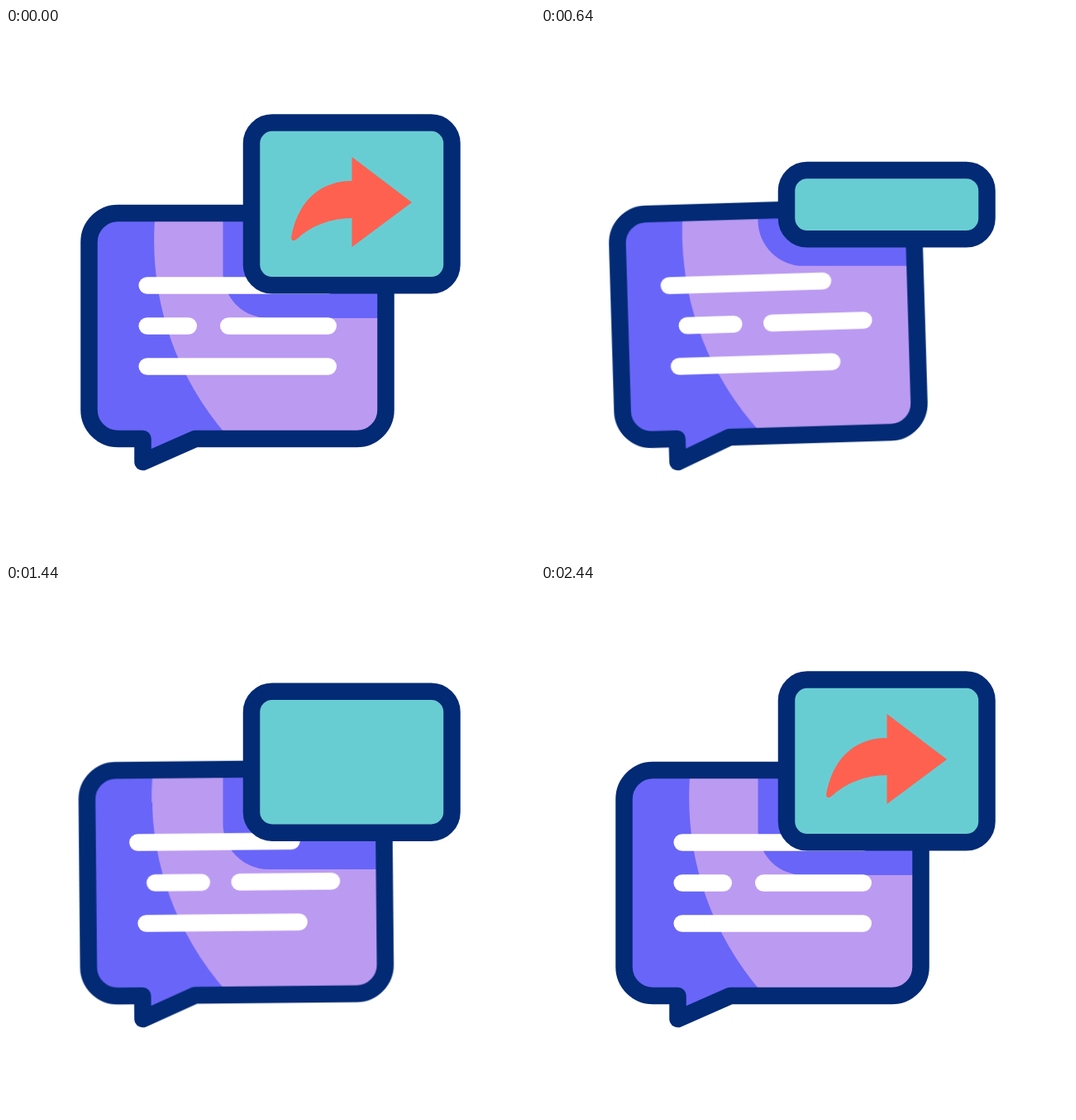
Write an HTML page without scripts that moves like this. It is 640 by 640 pixels and loops after 2640 ms.

```html
<!DOCTYPE html>
<html lang="en">
<head>
<meta charset="utf-8">
<title>Share message</title>
<style>
  @property --slide { syntax: "<number>"; inherits: true; initial-value: 0; }

  html, body { margin: 0; width: 100%; height: 100%; overflow: hidden; background: #fff; }
  svg { display: block; width: 100vw; height: 100vh; }

  .swing, .lines, .card, .shade, .arrow { animation: 2640ms cubic-bezier(.37, 0, .63, 1) infinite; }
  .swing { transform-origin: 165px 525px; animation-name: swing; }
  .lines { animation-name: slide; animation-timing-function: linear; }
  .card { animation-name: card; }
  .shade { animation-name: shade; }
  .arrow { transform-origin: 316px 211px; animation-name: arrow; }

  .outline { fill: none; stroke: #022a75; stroke-width: 20.5; stroke-linejoin: round; }
  .lines rect { height: 20.5px; rx: 10.25px; fill: #fff; }

  /* Every line is driven by the same slide amount. */
  .first { x: calc(160.5px - 26px * var(--slide)); width: calc(239.5px - 92px * var(--slide)); }
  .short { x: calc(160.5px + 31px * var(--slide)); width: calc(70.5px + 18px * var(--slide)); }
  .mid   { x: calc(259px + 42px * var(--slide)); width: calc(141px - 26px * var(--slide)); }
  .last  { x: 160.5px; width: calc(239.5px - 95px * var(--slide)); }

  @keyframes swing {
    0%, 1.515% { transform: rotate(0deg); animation-timing-function: ease-out; }
    5.3% { transform: rotate(3.4deg); }
    12.88% { transform: rotate(-3.1deg); }
    19.7% { transform: rotate(3.4deg); animation-timing-function: ease-in; }
    24.24% { transform: rotate(-1.7deg); animation-timing-function: ease-out; }
    26.89% { transform: rotate(-3.2deg); animation-timing-function: ease-in; }
    34.85% { transform: rotate(1.5deg); animation-timing-function: ease-out; }
    37.12% { transform: rotate(3.4deg); }
    43.18% { transform: rotate(-3.2deg); }
    50.38% { transform: rotate(3.4deg); animation-timing-function: ease-in; }
    54.55% { transform: rotate(-.5deg); animation-timing-function: ease-out; }
    57.95% { transform: rotate(-3.2deg); }
    66.67% { transform: rotate(3.5deg); }
    73.86% { transform: rotate(-3.2deg); }
    78.5%, 100% { transform: rotate(0deg); }
  }
  @keyframes slide {
    0%, 1.515%, 31.82%, 62.12%, 92.42%, 100% { --slide: 0; }
    14.39%, 44.7%, 75% { --slide: 1.03; }
    24.24%, 54.55%, 84.85% { --slide: .36; }
  }
  @keyframes card {
    0%, 1.515%, 80.68%, 100% { y: 114.6px; height: 196.6px; }
    12.88%, 13.64%, 66.29% { y: 108.3px; height: 212.4px; }
    28.79%, 31.82% { y: 188px; height: 50.8px; }
  }
  @keyframes shade {
    0%, 1.515%, 80.68%, 100% { height: 251px; }
    12.88%, 13.64%, 66.29% { height: 270.5px; }
    28.79%, 31.82% { height: 167px; }
  }
  @keyframes arrow {
    0%, 9.09% { transform: scaleX(1); animation-timing-function: ease-in; }
    22.73%, 74.24% { transform: scaleX(0); animation-timing-function: ease-out; }
    92.42%, 100% { transform: scaleX(1); }
  }
</style>
</head>
<body>
<svg viewBox="0 0 640 640">
  <defs>
    <path id="bubble" d="M135.500 224H424.500A35 35 0 0 1 459.500 259V462A35 35 0 0 1 424.500 497H229L165.500 525V497H135.500A35 35 0 0 1 100.500 462V259A35 35 0 0 1 135.500 224Z"/>
    <clipPath id="inside"><use href="#bubble" class="swing"/></clipPath>
  </defs>

  <g clip-path="url(#inside)">
    <rect width="640" height="640" fill="#6965f8"/>
    <path class="swing" d="M181 220C172 310 195 410 268 494H466V220Z" fill="#bb9af2"/>
    <rect class="shade" x="262.500" y="100" width="320" height="251" rx="55" fill="#6965f8"/>
  </g>

  <g class="swing">
    <use href="#bubble" class="outline"/>
    <g class="lines">
      <rect class="first" y="301.300"/>
      <rect class="short" y="350.300"/>
      <rect class="mid" y="350.300"/>
      <rect class="last" y="399.300"/>
    </g>
  </g>

  <rect class="card outline" x="297" y="114.600" width="242.500" height="196.600" rx="25" style="fill:#68cdd2"/>
  <path class="arrow" d="M418.500 156L491 211L418.500 265V230C393 230 369 239 351 256Q346 259 345 254C352 214 376 185 418.500 185Z" fill="#ff6150"/>
</svg>
</body>
</html>
```
